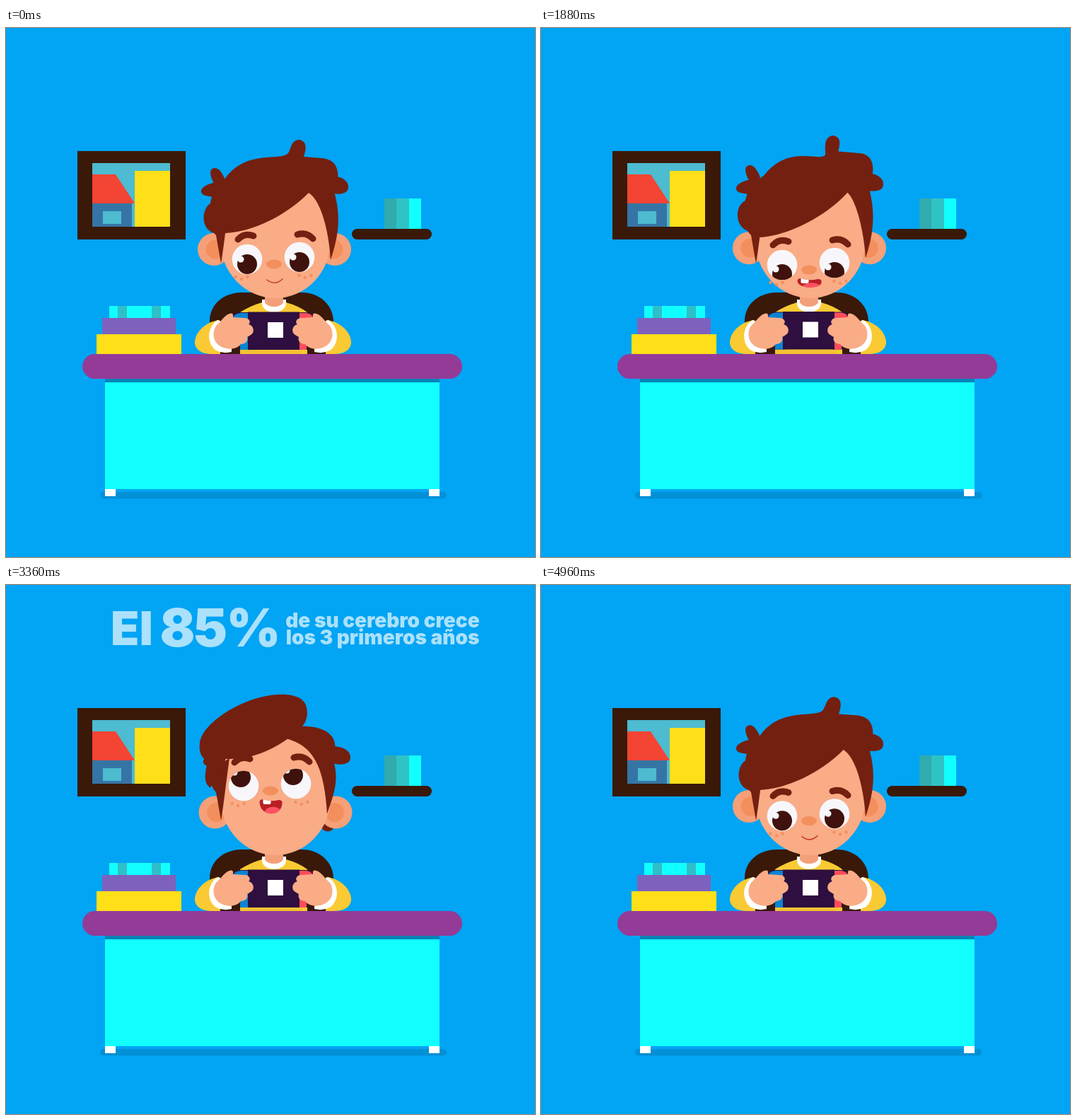
These frames come from a looping animation (748x748 px, 5000 ms). An HTML page:

```html
<!DOCTYPE html>
<html lang="es">
<head>
<meta charset="utf-8">
<style>
html,body{margin:0;width:100%;height:100%;overflow:hidden;background:#02a4f4}
svg{display:block;width:100vw;height:100vh}
text{font-family:Inter,"Open Sans",sans-serif;font-weight:900;fill:#fff}
.skin{fill:#f9ac86}.ear{fill:#f5a078}.blush{fill:#f38f5d}.hair{fill:#742010}.dark{fill:#3a1908}
.cyan{fill:#12ffff}.teal{fill:#4dbbd0}.yellow{fill:#ffdf18}.shirt{fill:#f9ca33}.white{fill:#fff}
.brow{fill:none;stroke:#742010;stroke-width:9;stroke-linecap:round}
</style>
</head>
<body>
<svg viewBox="0 0 748 748">
<defs>
  <clipPath id="eyeClip"><circle r="21.300"/></clipPath>
  <clipPath id="mouthClip"><path id="mouthHole"/></clipPath>
  <g id="hand">
    <path class="shirt" d="M302 413C281 415 266 432 267 446C268 456 279 461 290 461H303Z"/>
    <path class="white" d="M299 413C284 423 283 446 297 456Q307 461 319 458L318 420Z"/>
    <path class="skin" d="M297 421C306 413 309 406 316 404Q322 402 321 409L336 410C344 409 347 416 343 419C351 421 352 431 346 434Q343 436 341 437C343 443 338 447 332 447C328 453 318 455 311 453C295 450 289 434 297 421Z"/>
  </g>
</defs>

<rect width="748" height="748" fill="#02a4f4"/>
<rect class="dark" x="101" y="174" width="153" height="125"/>
<rect class="teal" x="122" y="191" width="110" height="90"/>
<rect class="yellow" x="182" y="202" width="50" height="79"/>
<rect x="122" y="247" width="56" height="34" fill="#3575a5"/>
<path d="M122 207H155L182 248H122Z" fill="#f44434"/>
<rect class="teal" x="137" y="259" width="26" height="18"/>

<rect class="dark" x="489" y="284" width="113" height="15" rx="7.500"/>
<rect x="535" y="241" width="18" height="43" fill="#30abae"/>
<rect x="552" y="241" width="18" height="43" fill="#2fc3c6"/>
<rect class="cyan" x="570" y="241" width="17" height="43"/>

<rect class="yellow" x="128" y="433" width="120" height="28"/>
<rect x="136" y="410" width="104" height="23" fill="#7e61bd"/>
<rect class="cyan" x="146" y="393" width="86" height="17"/>
<path d="M158 393h13v17h-13zM206 393h13v17h-13z" fill="#2fbfc8"/>

<path class="dark" d="M288 461V414C288 390 309 374 333 374H418C444 374 463 392 463 416V461Z"/>
<path class="shirt" d="M331 461V402Q345 393 362 388H396Q414 393 426 402V461Z"/>
<path class="white" d="M362 384H396V389C396 406 362 406 362 389Z"/>
<path d="M366 372H392V388C388 396 370 396 366 388Z" fill="#f3a079"/>

<g id="nape"><circle class="hair" cx="453" r="9.500"/></g>
<g id="ears">
  <circle class="ear" cx="294" r="23"/><circle class="ear" cx="465" r="23"/>
  <circle class="blush" cx="296" r="13.500"/><circle class="blush" cx="463" r="13.500"/>
</g>
<path class="skin" d="M303 300A78 82 0 0 0 459 300C457 250 440 222 403 215H340C310 222 303 260 303 300Z"/>
<path class="hair" d="M290 260Q287 285 297 293L304 333C308 310 311 280 316 245Z"/>
<g id="tufts" class="hair">
  <path d="M302 232C290 216 285 201 293 198.500C301 196 306 206 310 215Z"/>
  <path d="M304 217C286 219 275 225 276 232C278 239 288 236 300 242Z"/>
  <path d="M452 210C470 207 484 214 484 225C484 235 470 237 456 232Z"/>
</g>
<path id="hair" class="hair"/>

<g id="face">
  <g id="eyes"></g>
  <g id="freckles"></g>
  <ellipse class="blush" cx="379" cy="7" rx="11" ry="6.500"/>
  <g id="brows">
    <path class="brow" d="M328 3Q337 -7 350 -2"/>
    <path class="brow" d="M412 -4Q425 -8 434 2"/>
  </g>
  <path id="smile" d="M369 29Q380 38 391 28" fill="none" stroke="#c9402f" stroke-width="1.600" stroke-linecap="round"/>
  <g id="mouth" transform="translate(379.500 19)">
    <path id="lips" fill="#b91f25"/>
    <g clip-path="url(#mouthClip)">
      <ellipse id="tongue" cx="3" fill="#ff5064"/>
      <rect id="tooth" class="white" y="-3" width="11" height="10" rx="2"/>
    </g>
  </g>
</g>

<rect x="331" y="455" width="87" height="6" fill="#f4c233"/>
<g id="console">
  <path d="M345 402H331Q316 403 316 418L330 440V455H345ZM412 402H424Q439 403 439 418L426 440V455H412Z" fill="#2a1248"/>
  <path d="M343 403H332Q319 404 319 418L331 436V455H343Z" fill="#0a84d2"/>
  <path d="M414 403H424Q436 404 436 418L425 436V455H414Z" fill="#ff4c5c"/>
  <rect x="342" y="401.500" width="73" height="53.500" fill="#2e0f3f"/>
  <rect class="white" x="370" y="416" width="22" height="22"/>
</g>
<use href="#hand"/>
<use href="#hand" transform="matrix(-1 0 0 1 755 0)"/>

<rect x="133" y="656" width="490" height="9.500" rx="4.700" fill="#0290d6"/>
<rect class="cyan" x="140" y="496" width="473" height="156"/>
<rect x="140" y="495" width="473" height="6" fill="#0783b8"/>
<path class="white" d="M140 652h15v10h-15zM598 652h15v10h-15z"/>
<rect x="108" y="461" width="537" height="35" rx="17.500" fill="#933b97"/>

<g id="title">
  <text x="148" y="85" font-size="66">El</text>
  <g id="count"><text id="num" x="302" y="85" font-size="63" text-anchor="middle" letter-spacing="-1.500"></text></g>
  <g font-size="28" text-anchor="middle">
    <text x="532.500" y="60">de su cerebro crece</text>
    <text x="532.500" y="84">los 3 primeros años</text>
  </g>
</g>
</svg>
<script>
const $ = id => document.getElementById(id);
const set = (id, name, value) => $(id).setAttribute(name, value);
const move = (id, x, y) => set(id, 'transform', `translate(${x} ${y})`);
const clamp = k => Math.max(0, Math.min(1, k));

// Eased 0 to 1 between two times; hold() also eases back.
function ramp(t, from, to) {
  const k = clamp((t - from) / (to - from));
  return k * k * (3 - 2 * k);
}
const hold = (t, a, b, c, d) => ramp(t, a, b) - ramp(t, c, d);

const hairDown = 'M311 290C352 288 400 262 428 233C444 243 456 282 459 328C468 300 476 270 463 228C470 222 478 186 446 184L421 182C424 172 427 161 415 158C402 158 403 174 398 178C385 188 338 172 309 214C296 225 290 238 289 248C274 258 276 290 300 291Z';
const hairUp = 'M316 250C350 252 380 238 403 222C440 232 455 262 459 328C468 300 478 280 466 246C474 236 476 206 428 204L424 204C432 194 432 184 429 174C424 160 402 157 380 160C335 166 282 200 279 228C277 244 284 250 290 254C286 270 284 285 294 291Z';

function morph(a, b, k) {
  const end = b.match(/\d+/g);
  let i = 0;
  return a.replace(/\d+/g, n => (+n + (end[i++] - n) * k).toFixed(2));
}

const eye = (x, y) => `
  <g transform="translate(${x} ${y})" clip-path="url(#eyeClip)">
    <circle r="23" fill="#f7f7fb"/>
    <g class="pupil"><circle r="14" fill="#40120d"/><circle cx="-9" cy="-7" r="4.5" fill="#f7f7fb"/></g>
    <rect class="lid" x="-23" y="-23" width="46" height="0" fill="#ed8f5e"/>
  </g>`;
$('eyes').innerHTML = eye(341, 0) + eye(415, -3);

for (const [x, y] of [[333, 25], [423, 23]])
  for (const side of [-1, 0, 1])
    $('freckles').innerHTML += `<circle class="blush" cx="${x + side * 8.5}" cy="${y + (side ? 0 : 3)}" r="2.2"/>`;

const pupils = document.querySelectorAll('.pupil');
const lids = document.querySelectorAll('.lid');

function drawMouth(h, w) {
  const open = h > 3;
  set('smile', 'visibility', open ? 'hidden' : 'visible');
  set('mouth', 'visibility', open ? 'visible' : 'hidden');
  const lips = `M${-w} 4Q${-w} 0 ${5 - w} 0Q0 4 ${w - 5} 1Q${w + 1} 1 ${w} 6C${w - 1} ${h * 1.27} ${1 - w} ${h * 1.27} ${-w} 4Z`;
  set('lips', 'd', lips);
  set('mouthHole', 'd', lips);
  set('tongue', 'cy', h);
  set('tongue', 'rx', w * 0.75);
  set('tongue', 'ry', h * 0.48);
  set('tooth', 'x', 5 - w);
}

function drawTitle(t) {
  const pulse = 1 + 0.17 * hold(t, 2950, 3380, 3380, 3880);
  set('title', 'opacity', t < 2290 ? 0 : clamp((4740 - t) / 2060));
  move('title', 0, 92 * (ramp(t, 2290, 2700) - 1));
  set('count', 'transform', `translate(302 76) scale(${pulse}) translate(-302 -76)`);
  $('num').textContent = Math.round(85 * clamp((t - 2290) / 500)) + '%';
}

function draw(t) {
  const level = hold(t, 600, 1020, 1250, 1720);
  const dip = hold(t, 1250, 1720, 2150, 2650);
  const up = hold(t, 2150, 2650, 4400, 5000);
  const far = hold(t, 2850, 3280, 3700, 4250);
  const laugh = hold(t, 3700, 4250, 4400, 4900);
  const talk = hold(t, 650, 1000, 4400, 4800);
  const blink = hold(t, 4120, 4270, 4310, 4460);

  const pitch = 327 - 11 * level + 8 * dip - 37 * up - 6 * far - 4 * laugh;
  const yaw = 5 * (laugh - far);
  const tilt = Math.min(1, (327 - pitch) / 37);
  const sink = 19 * tilt;
  const lift = Math.min(0, pitch - 290) * 0.7;

  set('hair', 'd', morph(hairDown, hairUp, tilt));
  move('hair', yaw, lift + 10 * tilt * (1 - tilt));
  move('tufts', -yaw * 0.6, sink);
  move('nape', -yaw * 0.4, 320 + sink);
  move('ears', -yaw * 0.3, 313 + sink * 0.45);

  move('face', yaw, pitch);
  move('brows', 0, -31 - 5 * up + 4 * laugh);
  const look = `translate(${-4 * far} ${7 - 7 * level + 6 * dip - 18 * up - far})`;
  pupils.forEach(p => p.setAttribute('transform', look));
  lids.forEach(l => l.setAttribute('height', 36 * blink));
  drawMouth(12 * talk + 2 * level + 8 * far + 10 * laugh, 17 - far + 3 * laugh);

  move('console', 0, level / 2 - dip / 2 + ramp(t, 2150, 2650));
  drawTitle(t);
}

function tick() {
  draw(performance.now() % 5000);
  requestAnimationFrame(tick);
}
tick();
</script>
</body>
</html>
```
